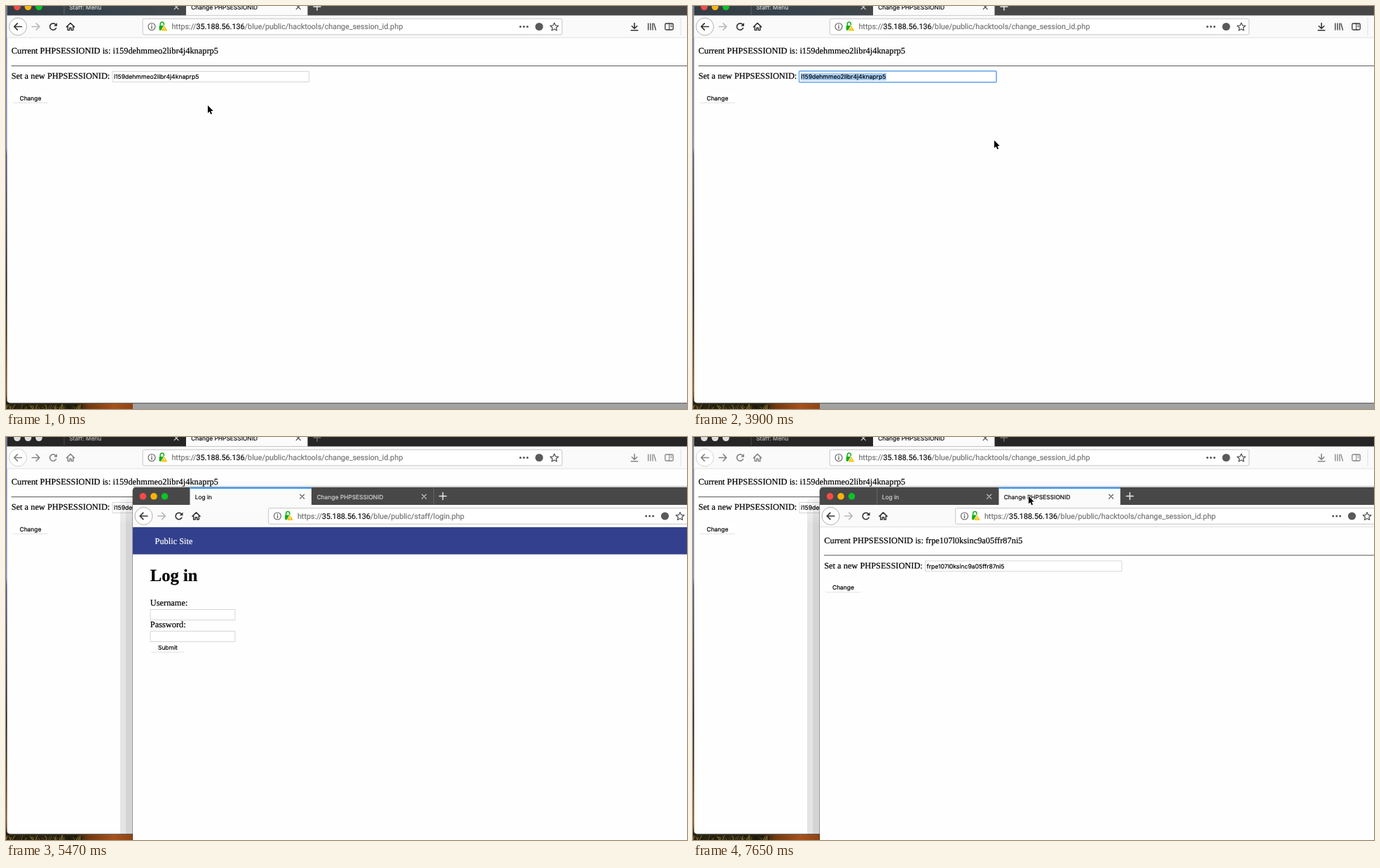
Animation, 972 px wide and 576 px high, one loop 8 s. Source, as an HTML page with a canvas:

```html
<!DOCTYPE html>
<html lang="en">
<head>
<meta charset="utf-8">
<title>Session ID demo</title>
<style>
html, body { margin: 0; width: 100%; height: 100%; overflow: hidden; background: #fff; }
canvas { display: block; }
</style>
</head>
<body>
<canvas id="stage" width="972" height="576"></canvas>
<script>
const ctx = document.getElementById('stage').getContext('2d');
const W = 972, H = 576, LOOP = 8000;
const SERIF = '"Liberation Serif", serif';
const UI = 'Inter, sans-serif';
const URL_FONT = '10.8px Roboto, sans-serif';
const BODY = '12.38px ' + SERIF;
const SMALL = '8.42px ' + UI;
const ID_A = 'i159dehmmeo2libr4j4knaprp5';
const ID_B = 'frpe107l0ksinc9a05ffr87ni5';
const CHANGE_PATH = '/blue/public/hacktools/change_session_id.php';
const LOGIN_PATH = '/blue/public/staff/login.php';
// Offset of the second window from the first.
const DX = 179.5, DY = 83.5;
// Title bar, relative to the first window.
const BAR_TOP = -11.5, BAR_END = 13.5, BAR_H = BAR_END - BAR_TOP;

// Pointer positions: start time, x, y, shape.
const POINTER = [
  [0, 288, 142, 'arrow'], [150, 287, 132, 'arrow'], [330, 286, 115, 'arrow'], [510, 285, 101, 'beam'],
  [810, 284, 101, 'beam'], [960, 272, 101, 'beam'], [1110, 243, 101, 'beam'], [1260, 207, 102, 'beam'],
  [1410, 176, 102, 'beam'], [1590, 156, 102, 'beam'], [1770, 148.5, 103, 'beam'],
  [3900, 430, 192, 'arrow'], [4040, 690, 262, 'arrow'], [4190, 759, 275, 'arrow'], [4500, 0, 0, 'none'],
  [5850, 760, 275, 'arrow'], [6000, 759, 268, 'arrow'], [6150, 757, 252, 'arrow'], [6300, 752, 233, 'arrow'],
  [6450, 690, 200, 'arrow'], [6600, 565, 147, 'arrow'], [6750, 482, 112, 'arrow'], [6900, 453, 101, 'arrow'],
  [7050, 462, 93, 'arrow'], [7200, 474, 87, 'arrow'], [7350, 479, 85, 'arrow'], [7650, 479, 84.5, 'arrow']
];

function pointerAt(t) {
  const [, x, y, shape] = POINTER.findLast(p => p[0] <= t);
  return { x, y, shape };
}

function rect(x, y, w, h, fill) {
  ctx.fillStyle = fill;
  ctx.fillRect(x, y, w, h);
}

function box(x, y, w, h, r, fill, stroke, width = 1) {
  ctx.beginPath();
  ctx.roundRect(x, y, w, h, r);
  if (fill) { ctx.fillStyle = fill; ctx.fill(); }
  if (stroke) { ctx.strokeStyle = stroke; ctx.lineWidth = width; ctx.stroke(); }
}

function dot(x, y, r, fill, stroke, width = 1) {
  ctx.beginPath();
  ctx.arc(x, y, r, 0, 7);
  if (fill) { ctx.fillStyle = fill; ctx.fill(); }
  if (stroke) { ctx.strokeStyle = stroke; ctx.lineWidth = width; ctx.stroke(); }
}

function trace(d, x, y, stroke, width, fill) {
  const path = new Path2D(d);
  ctx.save();
  ctx.translate(x, y);
  ctx.lineJoin = 'round';
  ctx.lineCap = 'round';
  if (stroke) { ctx.strokeStyle = stroke; ctx.lineWidth = width; ctx.stroke(path); }
  if (fill) { ctx.fillStyle = fill; ctx.fill(path); }
  ctx.restore();
}

// A hairline stroke gives the slightly heavier desktop text smoothing.
function text(str, x, y, font, fill) {
  ctx.font = font;
  ctx.textRendering = 'geometricPrecision';
  ctx.fillStyle = ctx.strokeStyle = fill;
  ctx.lineWidth = .2;
  ctx.fillText(str, x, y);
  ctx.strokeText(str, x, y);
  return x + ctx.measureText(str).width;
}

function gradient(x0, y0, x1, y1, stops) {
  const g = ctx.createLinearGradient(x0, y0, x1, y1);
  for (const [at, color] of stops) g.addColorStop(at, color);
  return g;
}

function drawDesktop() {
  rect(0, 0, 3, H, gradient(0, 0, 0, H, [
    [0, '#6d83a5'], [.35, '#7d90b0'], [.37, '#48557a'], [.57, '#2b3049'],
    [.7, '#17161d'], [.82, '#3b2817'], [.95, '#80511f'], [1, '#2a200e']]));
  rect(0, 560, 181, 16, gradient(0, 0, 181, 0, [
    [0, '#2a2411'], [.55, '#241e0d'], [.65, '#70390f'], [.85, '#a8501a'], [1, '#8f4312']]));
  let seed = 7;
  const rnd = () => (seed = seed * 16807 % 2147483647) / 2147483647;
  ctx.lineWidth = 1;
  for (let i = 0; i < 60; i++) {
    const x = rnd() * 112;
    ctx.strokeStyle = ['#61592a', '#14140a', '#86702f'][i % 3];
    ctx.beginPath();
    ctx.moveTo(x, 576);
    ctx.lineTo(x + rnd() * 8 - 4, 569 + rnd() * 4);
    ctx.stroke();
  }
  rect(181, 566, W - 181, 10, '#a2a2a2');
  rect(5, 567, W, 1.2, '#686868');
}

function drawButton(label, x, y, w) {
  box(x, y, w, 13.5, 3, gradient(0, y, 0, y + 14, [[0, '#fff'], [.85, '#fff'], [1, '#c9c9c9']]));
  box(x, y - 1, w, 13.5, 3, '#fff');
  text(label, x + 11, y + 9.7, SMALL, '#000');
}

function drawField(x, y, w) {
  box(x, y, w, 15, 0, '#fff', '#d6d6d6');
}

function drawLogin() {
  rect(1.5, 45.5, W, 38.7, '#32408d');
  text('Public Site', 33, 69.2, BODY, '#fff');
  text('Log in', 26.3, 122, 'bold 24.6px ' + SERIF, '#000');
  text('Username:', 26.3, 157.7, BODY, '#000');
  drawField(26.5, 163, 121);
  text('Password:', 26.3, 188.9, BODY, '#000');
  drawField(26.5, 194, 121);
  drawButton('Submit', 26.5, 211, 50);
}

function drawChange(id, focus, selectFrom) {
  text('Current PHPSESSIONID is: ' + id, 7.7, 68.2, BODY, '#000');
  rect(7.5, 85, W, 1.1, '#666');
  text('Set a new PHPSESSIONID:', 7.7, 104.2, BODY, '#000');
  if (focus) box(151.5, 93, 281.5, 16, 1, '#fff', '#85b9ee', 2);
  else drawField(152, 93.5, 280.5);
  if (selectFrom < 276) rect(selectFrom, 96, 276 - selectFrom, 10.5, '#a9cff4');
  text(id, 154, 104.1, '8.6px ' + UI, '#000');
  drawButton('Change', 8.5, 125.2, 53);
}

function drawTabs(win) {
  const bar = !win.active ? '#262626' : win.tint || '#484848';
  box(1.5, BAR_TOP, W, BAR_H, [4, 4, 0, 0], bar);
  const lights = win.active ? ['#fb4a46', '#fdb409', '#0ac427'] : Array(3).fill('#dedede');
  lights.forEach((c, i) => dot(16 + i * 15.5, 1.3, 4.8, c));
  win.tabs.forEach((label, i) => {
    const x = 83 + i * 174, on = i === win.selected;
    if (on) {
      rect(x, BAR_TOP, 173.5, BAR_H, '#fbfbfb');
      rect(x, BAR_TOP, 173.5, 1.7, '#0a84ff');
    } else {
      if (i === win.hover) rect(x, BAR_TOP, 173.5, BAR_H, '#5a5a5a');
      rect(i ? x + 173.5 : x - .5, BAR_TOP, 1, BAR_H, win.active ? '#606468' : '#484848');
    }
    text(label, x + 7.2, 5, SMALL, on ? '#0c0c0d' : win.active ? '#d2d2d2' : '#b4b4b4');
    trace('M-3-3L3 3M3-3L-3 3', x + 160.2, 1.6, on ? '#4a4a4a' : '#d0d0d0', 1.2);
  });
  trace('M-5 0H5M0-5V5', 444, 1, win.active ? '#e8e8e8' : '#707070', 1.5);
}

function drawToolbar(win) {
  const ink = win.active ? '#343434' : '#858585';
  const off = win.active ? '#b7b7b7' : '#858585';
  rect(1.5, BAR_END, W, 45.5 - BAR_END, '#fafafa');
  rect(1.5, 44.7, W, .8, '#dcdcdc');

  dot(17, 29.5, 12.5, '#fff', win.active ? '#b0b0b0' : '#d4d4d4');
  trace('M5.3 0H-5M-.7-4.6L-5.3 0L-.7 4.6', 17, 29.5, ink, 1.7);
  trace('M-5.3 0H5M.7-4.6L5.3 0L.7 4.6', 42.5, 29.5, off, 1.6);
  trace('M4.2 2.2A4.7 4.7 0 1 1 3.6-3', 67.3, 29.5, ink, 1.6);
  trace('M5.7-5.5V-.7H.9Z', 67.3, 29.5, null, 0, ink);
  trace('M-5.6.3L0-5.2L5.6.3M-3.8-.5V5H-1.2V1.6H1.2V5H3.8V-.5', 92, 29.6, ink, 1.5);

  box(195.2, 18.2, 598.5, 22.7, 2, win.urlHover ? '#f7f7f7' : '#fff', win.urlHover ? '#a2a2a2' : '#c6c6c6');
  dot(208, 29.5, 5, null, '#5c5c5c', 1.1);
  rect(207.3, 28.7, 1.4, 3.8, '#5c5c5c');
  rect(207.3, 26.4, 1.4, 1.4, '#5c5c5c');
  trace('M-2.6-.5V-2.6A2.6 2.8 0 0 1 2.6-2.6V-.5', 222.8, 28.5, '#12b01a', 1.5);
  box(218.6, 28, 8.2, 6.8, 1, '#12b01a');
  trace('M0-4.2L4.2 3.6H-4.2Z', 226, 32, '#fff', 1.6, '#ffbf00');
  rect(225.5, 30.2, 1, 2.6, '#fff');
  rect(225.5, 33.5, 1, 1, '#fff');

  let x = text('https://', 236.4, 33.4, URL_FONT, '#747474');
  x = text('35.188.56.136', x, 33.4, URL_FONT, '#0c0c0d');
  text(win.path, x, 33.4, URL_FONT, '#747474');

  for (let i = 0; i < 3; i++) dot(734.2 + i * 5, 29.5, 1.5, '#545454');
  dot(761, 29.5, 5.6, '#5a5a5a');
  trace('M0-5.8L1.7-2L5.8-1.6L2.7 1.2L3.6 5.2L0 3.1L-3.6 5.2L-2.7 1.2L-5.8-1.6L-1.7-2Z', 782.6, 29.8, '#4e4e4e', 1.2);

  trace('M0-5V2.5M-3.7-.8L0 2.8L3.7-.8M-4.8 5.3H4.8', 897, 29.5, ink, 1.6);
  trace('M-5-4.6V4.6M-1.8-4.6V4.6M1.3-4.6V4.6M3.2-4.4L5.7 4.6', 921.7, 29.5, ink, 1.3);
  box(940.8, 25, 11.4, 9, 1.5, null, ink, 1.3);
  trace('M.2-4.5V4.5M2.2-2.2H3.8M2.2 0H3.8', 946.5, 29.5, ink, 1);
  rect(962.5, 17, 1, 25, '#e2e2e2');
}

function drawWindow(win, height, page) {
  box(1.5, BAR_TOP, W + 20, height, 4, '#fefefe');
  page();
  drawToolbar(win);
  drawTabs(win);
}

function drawShadow(active) {
  const bands = active ? [[163, .1], [171, .07]] : [[172, .1]];
  for (const [x, alpha] of bands) {
    box(x, 84, 181 - x, 484, [8, 0, 0, 0], gradient(0, 84, 0, 125, [
      [0, 'rgba(0,0,0,.02)'], [1, `rgba(0,0,0,${alpha})`]]));
  }
  rect(183, 69.5, W, 1, 'rgba(0,0,0,.08)');
  rect(182, 70.5, W, 1.5, 'rgba(0,0,0,.22)');
  rect(180.3, 76, 1, H, 'rgba(0,0,0,.4)');
}

function drawPointer({ x, y, shape }) {
  if (shape === 'arrow') {
    trace('M0 0V11L2.5 8.8L4.3 12.7L6.1 11.9L4.4 8.1H7.8Z', x, y, '#fff', 1.5, '#000');
  } else if (shape === 'beam') {
    const beam = 'M-2.5-6Q0-6 0-4.5Q0-6 2.5-6M0-4.5V4.5M-2.5 6Q0 6 0 4.5Q0 6 2.5 6';
    trace(beam, x, y, 'rgba(255,255,255,.7)', 2.2);
    trace(beam, x, y, '#222', 1);
  }
}

function draw(t) {
  const pointer = pointerAt(t);
  const second = t >= 5300;
  const switched = t >= 5470;
  const focus = t >= 810 && !second;
  const selectFrom = focus ? Math.max(154, pointer.shape === 'beam' ? pointer.x : 154) : W;

  ctx.clearRect(0, 0, W, H);
  drawDesktop();
  const first = {
    active: !switched, tabs: ['Staff: Menu', 'Change PHPSESSIONID'], selected: 1, path: CHANGE_PATH,
    tint: gradient(0, 0, 262, 0, [[0, '#343c43'], [.55, '#36434d'], [.9, '#40464b'], [1, '#474747']])
  };
  drawWindow(first, 578.5, () => drawChange(ID_A, focus, selectFrom));

  if (second) {
    drawShadow(switched);
    const onChange = t >= 7350;
    const win = {
      active: switched, tabs: ['Log in', 'Change PHPSESSIONID'],
      selected: onChange ? 1 : 0,
      path: onChange ? CHANGE_PATH : LOGIN_PATH,
      hover: t >= 7050 && !onChange ? 1 : -1,
      urlHover: pointer.shape === 'arrow' && pointer.y >= 101 && pointer.y < 125
    };
    ctx.save();
    ctx.translate(DX, DY);
    drawWindow(win, 620, () => t >= 7500 ? drawChange(ID_B, false, W) : drawLogin());
    ctx.restore();
  }
  drawPointer(pointer);
}

const start = performance.now();
function frame() {
  draw((performance.now() - start) % LOOP);
  requestAnimationFrame(frame);
}
frame();
</script>
</body>
</html>
```
